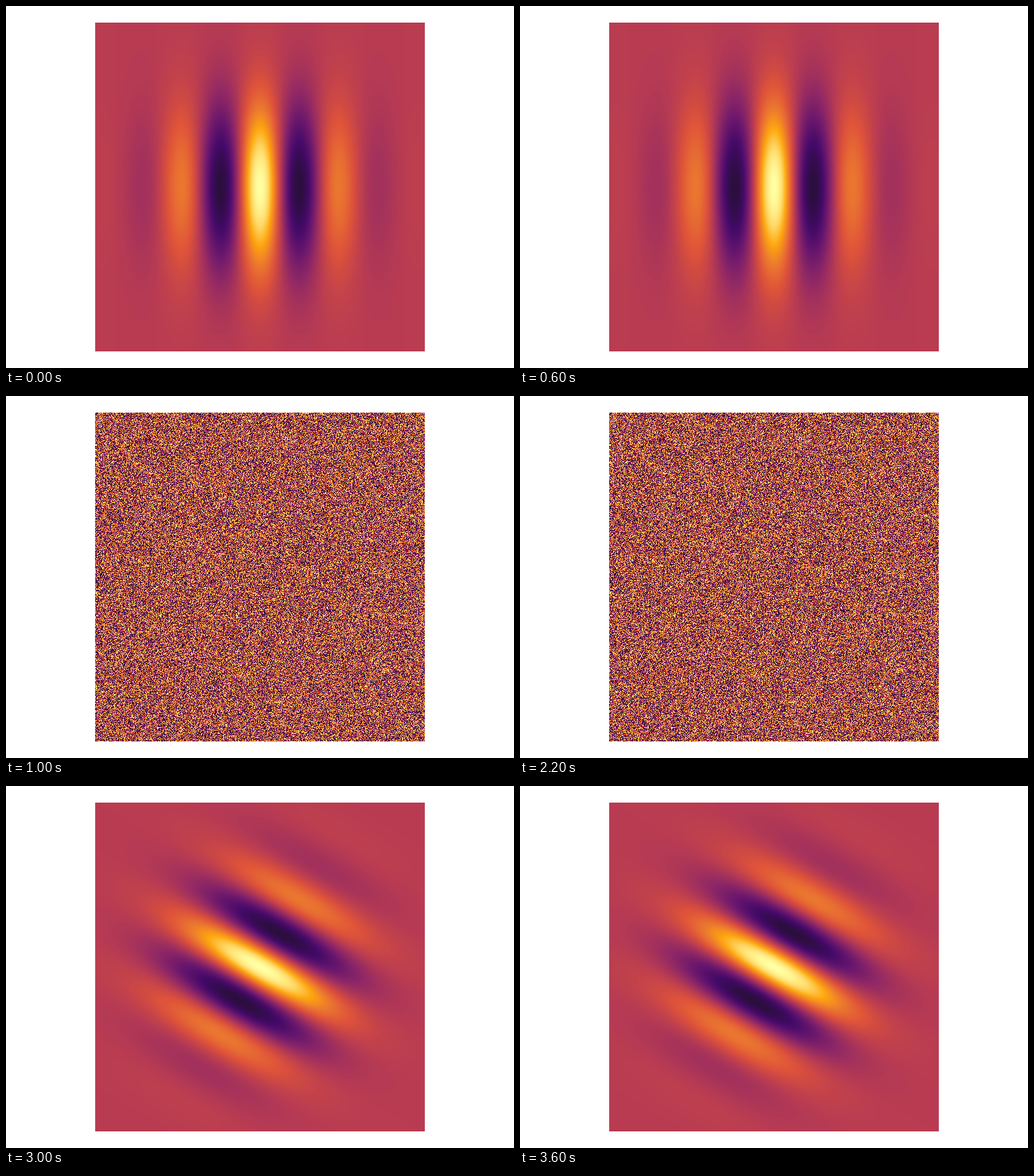
Animation of 672x480 px, one loop 4000 ms. Source, as a matplotlib script:

```python
import numpy as np
import matplotlib.pyplot as plt
from matplotlib.animation import FuncAnimation
from matplotlib.colors import LinearSegmentedColormap

WIDTH, HEIGHT, DPI = 672, 480, 100
SIZE = 436          # patch side in pixels
PERIOD = SIZE / 4   # four cycles across the patch
SIGMA = 77          # envelope width in pixels

# Softened inferno, evenly spaced from dark to light
COLOURS = ["#040108", "#2a0f3b", "#430a68", "#6a176e", "#912965", "#b93c52",
           "#de533a", "#ec792f", "#fea50f", "#ffd966", "#ffffa4"]
EMBER = LinearSegmentedColormap.from_list("ember", COLOURS)

axis = np.arange(SIZE) - (SIZE - 1) / 2
x, y = np.meshgrid(axis, -axis)


def gabor(degrees):
    """Cosine grating under a round Gaussian, its normal turned by degrees."""
    angle = np.radians(degrees)
    across = x * np.cos(angle) + y * np.sin(angle)
    envelope = np.exp(-(x**2 + y**2) / (2 * SIGMA**2))
    return envelope * np.cos(2 * np.pi * across / PERIOD)


def noise(seed=0):
    return np.random.default_rng(seed).uniform(-1, 1, (SIZE, SIZE))


# One entry per second: cue, two seconds of mask, rotated probe
mask = noise()
sequence = [gabor(0), mask, mask, gabor(60)]

fig = plt.figure(figsize=(WIDTH / DPI, HEIGHT / DPI), dpi=DPI, facecolor="white")
ax = fig.add_axes([(WIDTH - SIZE) / 2 / WIDTH, (HEIGHT - SIZE) / 2 / HEIGHT,
                   SIZE / WIDTH, SIZE / HEIGHT])
ax.axis("off")
image = ax.imshow(sequence[0], cmap=EMBER, vmin=-1, vmax=1,
                  interpolation="nearest", aspect="auto")


def update(i):
    image.set_data(sequence[i])
    return [image]


anim = FuncAnimation(fig, update, frames=len(sequence), interval=1000,
                     repeat=True, repeat_delay=0)
plt.show()
```
